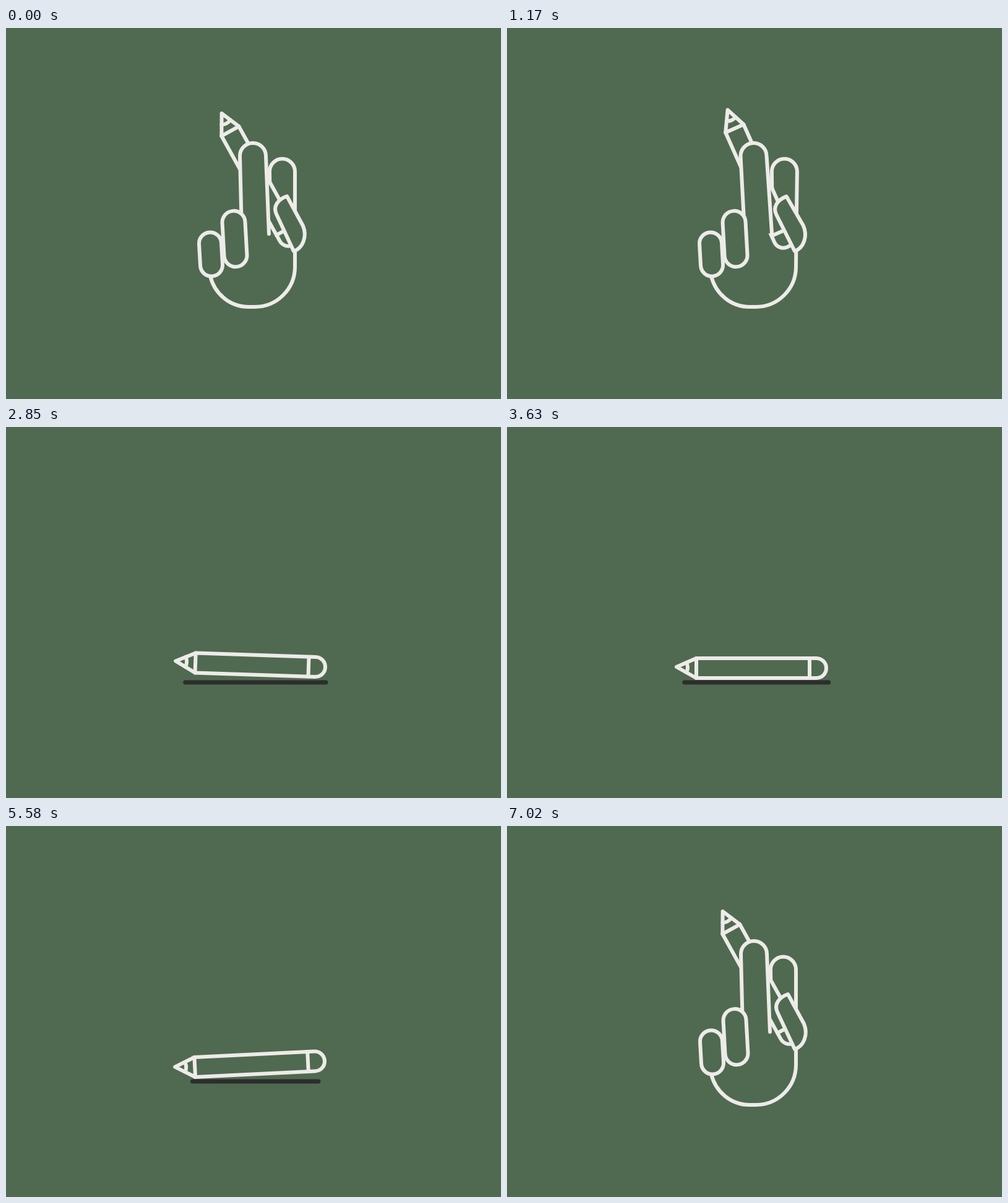
Write an HTML page that moves like this. It is 800x600 px and loops after 7170 ms.

```html
<!DOCTYPE html>
<html lang="en">
<head>
<meta charset="utf-8">
<title>Pencil in hand</title>
<style>
  html, body { margin: 0; width: 100%; height: 100%; overflow: hidden; background: #4f6a50; }
  svg { display: block; width: 100vw; height: 100vh; }
  path, rect { fill: #4f6a50; stroke: #edebe8; stroke-width: 6; stroke-linecap: round; stroke-linejoin: round; }
  #pencil .line { fill: none; }
  #shadow { stroke: #2d2d2d; stroke-width: 7; }
</style>
</head>
<body>
<svg viewBox="0 0 800 600">
  <path id="shadow"/>
  <g class="hand"><path id="palm"/></g>
  <g id="pencil">
    <path d="M-90 -16 H104 A16 16 0 0 1 104 16 H-90 L-122 -2 Z"/>
    <path class="line" d="M-90 -16 V16 M93 -16 V16 M-106 -9 Q-102 -1 -106 7"/>
  </g>
  <g class="hand">
    <path id="index" d="M-18 123 L-21 0 A21 21 0 0 1 21 0 L26 126"/>
    <rect id="pinky" x="-18" y="-35.5" width="36" height="71" rx="18"/>
    <rect id="ring" x="-18.5" y="-45.2" width="37" height="90.4" rx="18.5"/>
    <path id="thumb" d="M-11 -89 L15 -41 C22 -24 15 -5 0 0 L-28 -60 C-34 -73 -25 -84 -11 -89 Z"/>
  </g>
</svg>
<script>
const LOOP = 7170;
const SPIN = 210, SPUN = 1080, STILL = 1410;
const FALL = 1860, LAND = 2490, REST = 3630;
const ROCK = 4890, JUMP = 5625, CATCH = 6210, SETTLED = 6960;

const $ = id => document.getElementById(id);
const hands = document.querySelectorAll('.hand');

const linear = u => u;
const easeIn = u => u * u;
const easeOut = u => 1 - (1 - u) ** 3;
const inOut = u => u < .5 ? 4 * u ** 3 : 1 - 4 * (1 - u) ** 3;

// Progress from 0 to 1 between two times, and a single hump between them.
const span = (t, from, to, ease = linear) =>
  ease(Math.min(1, Math.max(0, (t - from) / (to - from))));
const pulse = (t, from, to) => Math.sin(Math.PI * span(t, from, to));

const move = (id, x, y, turn) =>
  $(id).setAttribute('transform', `translate(${x} ${y}) rotate(${turn})`);

function spinAndFall(t) {
  const spin = pulse(t, SPIN, SPUN), settle = pulse(t, 930, STILL);
  const fall = span(t, FALL, LAND, easeIn);
  return [
    406 + 6 * spin - 1.6 * settle + 24 * pulse(t, FALL, LAND) - 5.7 * fall,
    245.7 - settle - 12 * pulse(t, FALL, 2100) + 114.8 * fall,
    61 + 360 * span(t, SPIN, SPUN, inOut) + 5 * settle - 44.5 * fall
  ];
}

// On the ground the tip bounces out, later the pencil rocks on its shoulder.
function onGround(t) {
  const bounce = 16.5 * (1 - span(t, LAND, REST)) ** 2
    * Math.abs(Math.cos((t - LAND) / 430 * Math.PI / 2));
  const angle = bounce - 15 * pulse(t, ROCK, JUMP);
  const sin = Math.sin(angle * Math.PI / 180), cos = Math.cos(angle * Math.PI / 180);
  return angle < 0
    ? [306 + 90 * cos + 16 * sin, 406 + 90 * sin - 16 * cos, angle]
    : [500 - 104 * cos, 390 - 104 * sin - 2 * pulse(t, LAND, 3200), angle];
}

function jumpAndSettle(t) {
  const flight = span(t, JUMP, CATCH), settle = span(t, CATCH, SETTLED, easeOut);
  return [
    396 + 24.5 * flight - 30 * pulse(t, JUMP, 5900) - 14.5 * settle,
    390 - 135.5 * span(t, JUMP, 6040, easeOut) - 24 * pulse(t, 5850, CATCH) - 8.8 * settle,
    316 * flight + 105 * settle
  ];
}

function drawHand(t) {
  const open = span(t, 1900, 2300) - span(t, CATCH, SETTLED, easeOut);
  const flex = Math.sin(3 * Math.PI * span(t, SPIN, STILL));
  const middle = 446.5 - 19 * open + 2 * flex;

  $('palm').setAttribute('d', `M${middle - 19.5} ${300 - 25 * open}
    L${middle - 20.5} 232 A20.5 20.5 0 0 1 ${middle + 20.5} ${232 - 4 * open}
    L${467 - 6.5 * open + flex} ${300 + 20 * open} L${467 - open} ${386 - 4 * open}
    C467 422 ${438 + 2 * open} 451 402 ${451 + open} L392 ${451 + open}
    C362 451 337 430 ${330 + 2 * open} ${401 + 5 * open}`);
  move('index', 399 - 26 * open - .5 * flex, 207 + 2.5 * open, -9.4 * open - 1.7 * flex);
  move('ring', 369.5 + 5.5 * open - flex, 341 + 3 * open, -3.2 + 7.5 * open);
  move('pinky', 331 + 3.2 * open - flex, 366 + 5.5 * open, -3.3 + 4.4 * open);
  move('thumb', 465 - .5 * open, 361 - 2.5 * open, -28 * open - 1.7 * flex);

  const leaving = t < 2400;
  const size = leaving ? 1 : span(t, 5850, 6130, easeOut);
  const drop = leaving ? 440 * span(t, 1930, 2400, easeIn) : 0;
  for (const hand of hands) {
    hand.style.display = size ? '' : 'none';
    hand.setAttribute('transform',
      `translate(398 ${400 + drop}) scale(${size}) translate(-398 -400)`);
  }
}

function drawShadow(t) {
  const half = (116.5 * span(t, 2250, 3100, easeOut) - 79 * pulse(t, ROCK, JUMP))
    * (1 - span(t, JUMP, 5780));
  $('shadow').style.display = half > 1 ? '' : 'none';
  $('shadow').setAttribute('d', `M${403.3 - half} 413 H${403.3 + half}`);
}

function render(t) {
  const pose = t < LAND ? spinAndFall : t < JUMP ? onGround : jumpAndSettle;
  move('pencil', ...pose(t));
  drawHand(t);
  drawShadow(t);
}

const start = performance.now();
function tick() {
  render((performance.now() - start) % LOOP);
  requestAnimationFrame(tick);
}
tick();
</script>
</body>
</html>
```
